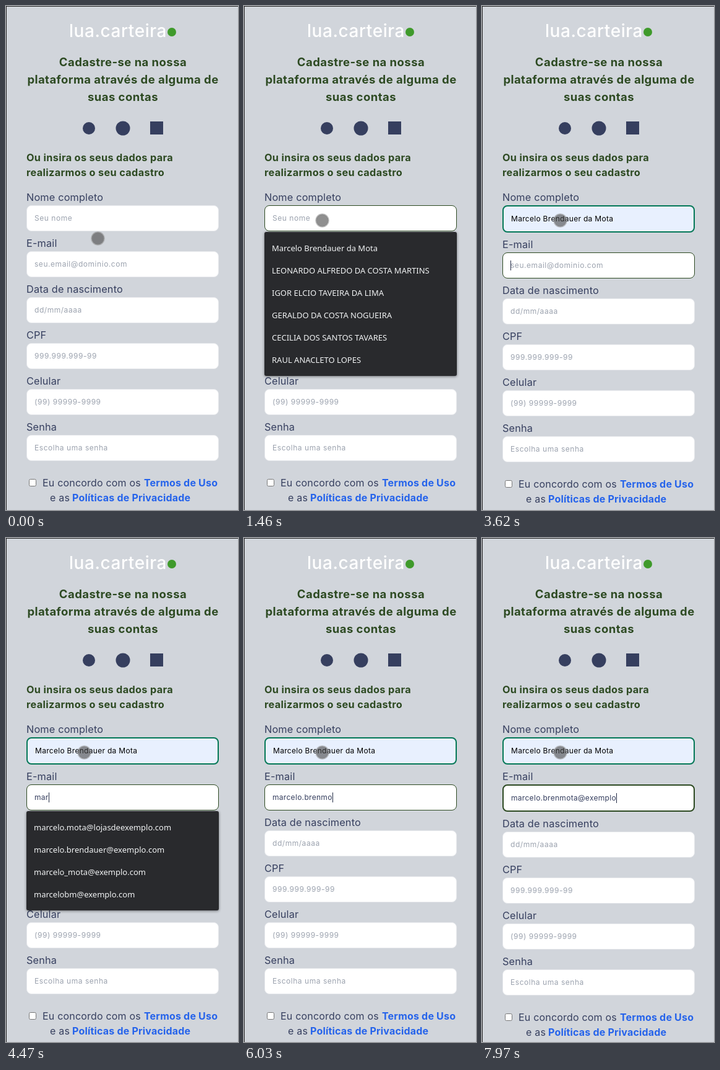
These frames come from a looping animation (375x812 px, 8 s). An HTML page:

```html
<!DOCTYPE html>
<html lang="pt-BR">
<head>
<meta charset="utf-8">
<title>Cadastro</title>
<style>
  html, body { margin: 0; width: 100%; height: 100%; overflow: hidden; background: #d1d5db; }
  svg { display: block; width: 375px; height: 812px; font-family: Inter, Roboto, sans-serif; }
  text { white-space: pre; }
  .logo { font-size: 28px; font-weight: 500; letter-spacing: .02em; fill: #fff; }
  .title { font-size: 18.5px; font-weight: 700; letter-spacing: .024em; fill: #2d4a22; text-anchor: middle; }
  .lead { font-size: 16.3px; font-weight: 700; letter-spacing: .02em; fill: #2d4a22; }
  .label { font-size: 16.3px; letter-spacing: .01em; fill: #363f5f; }
  .terms { font-size: 16px; letter-spacing: .012em; fill: #363f5f; }
  .link { font-size: 16px; font-weight: 700; letter-spacing: .012em; fill: #2563eb; }
  .hint, .value { font-size: 12px; }
  .hint { letter-spacing: .045em; fill: #9ca3af; }
  .value { letter-spacing: .025em; fill: #363f5f; }
  .filled { fill: #000; }
  .option { font: 13px "Noto Sans", "Open Sans", sans-serif; fill: #f1f3f4; }
  .menu { filter: drop-shadow(0 1px 2px #0007); }
</style>
</head>
<body>
<svg id="stage" viewBox="0 0 375 812"></svg>
<script>
const LOOP = 8000, GREEN = '#2d4a22';
const stage = document.getElementById('stage');

const FIELDS = [
  ['Nome completo', 'Seu nome'],
  ['E-mail', 'seu.email@dominio.com'],
  ['Data de nascimento', 'dd/mm/aaaa'],
  ['CPF', '999.999.999-99'],
  ['Celular', '(99) 99999-9999'],
  ['Senha', 'Escolha uma senha']
];
const PEOPLE = [
  'Marcelo Brendauer da Mota', 'LEONARDO ALFREDO DA COSTA MARTINS',
  'IGOR ELCIO TAVEIRA DA LIMA', 'GERALDO DA COSTA NOGUEIRA',
  'CECILIA DOS SANTOS TAVARES', 'RAUL ANACLETO LOPES'
];
const MATCHES = [
  'Marcelo Brendauer da Mota', 'Marcelo da Mota', 'MARCELO ANSELMO NOGUEIRA DE MOURA',
  'MARCELO SIQUEIRA MEIRELES', 'Marcelo da mota', 'MARCELO DE MACHADO PAIVA'
];
const EMAILS = [
  'marcelo.mota@lojasdeexemplo.com', 'marcelo.brendauer@exemplo.com',
  'marcelo_mota@exemplo.com', 'marcelobm@exemplo.com'
];

// Moments at which each character appears
const NAME_KEYS = [1690, 1770, 1850, 1930, 2020, 2120, 2230];
const MAIL_KEYS = [
  4170, 4270, 4400, 4510, 4630, 4750, 4870, 5170,
  5340, 5480, 5620, 5750, 5890, 6030, 6200, 6280, 6600,
  7040, 7200, 7350, 7500, 7660, 7810, 7970
];
const POINTER = [[0, 148.5, 374.5], [70, 146, 398], [150, 136, 418], [230, 118, 392], [300, 117, 362], [380, 126.5, 345.5]];

const typed = (text, keys, t) => text.slice(0, keys.filter(k => k <= t).length);
const text = (cls, x, y, s, id = '') => `<text class="${cls}" x="${x}" y="${y}"${id && ` id="${id}"`}>${s}</text>`;
const rect = (x, y, w, h, fill, more = '') => `<rect x="${x}" y="${y}" width="${w}" height="${h}" fill="${fill}" ${more}/>`;
const circle = (x, y, r, fill, more = '') => `<circle cx="${x}" cy="${y}" r="${r}" fill="${fill}" ${more}/>`;

function menu(y, options, active, height = options.length * 36 + 16) {
  const rows = options.map((s, i) =>
    (i === active ? rect(33, y + 8 + i * 36, 311, 36, '#404145') : '') +
    text('option', 45, y + 31 + i * 36, s)).join('');
  return `<clipPath id="cut">${rect(33, y, 311, height, '#000')}</clipPath>
    <g class="menu">${rect(33, y, 311, height, '#292a2d', 'rx="3"')}<g clip-path="url(#cut)">${rows}</g></g>`;
}

// One box with its text; a confirmed box has a 2px border and is 2px taller
function input(y, hint, { value = '', border = '#e5e7eb', width = 1, filled, focus } = {}) {
  const o = width / 2, x = 45 + width, base = y + 24 + width;
  return rect(33 + o, y + o, 311 - width, 40 + width, filled ? '#e8f0fe' : '#fff',
      `rx="${8 - o}" stroke="${border}" stroke-width="${width}"`) +
    text(value ? 'value' + (filled ? ' filled' : '') : 'hint', x, base, value || hint, focus ? 'live' : '') +
    (focus ? rect(x, base - 12, 1, 16, '#222b45', `id="caret" data-x="${value ? x : 0}"`) : '');
}

const HEADER =
  rect(0, 0, 375, 812, '#d1d5db') +
  text('logo', 102, 50, 'lua.carteira') + circle(268, 42, 7, '#3f9a2b') +
  text('title', 189, 97, 'Cadastre-se na nossa') +
  text('title', 189, 125, 'plataforma através de alguma de') +
  text('title', 189, 153, 'suas contas') +
  circle(134, 197, 10, '#363f5f') + circle(189, 197, 11.5, '#363f5f') + rect(233, 186, 21, 21, '#363f5f') +
  text('lead', 33, 250, 'Ou insira os seus dados para') +
  text('lead', 33, 274, 'realizarmos o seu cadastro');

function nameState(t) {
  const filled = t >= 2990;
  const value = filled ? PEOPLE[0] : typed('Marcelo', NAME_KEYS, t);
  const focus = t >= 690 && t < 3620 && !(t >= 1190 && t < 1690) && !(t >= 2690 && t < 3220);
  const border = t < 690 ? undefined : t < 3620 ? GREEN : '#047857';
  return { value, filled, focus, border, width: value ? 2 : 1 };
}

function mailState(t) {
  if (t < 3620) return {};
  return {
    value: typed('marcelo.brenmota@exemplo', MAIL_KEYS, t),
    focus: true, border: GREEN, width: t >= 7040 ? 2 : 1
  };
}

function openMenu(t) {
  if (t >= 760 && t < 1690) return menu(364, PEOPLE);
  if (t >= 1690 && t < 3220) return menu(366, MATCHES, t >= 2990 ? 0 : -1);
  if (t >= 4170 && t < 5260) return menu(440, EMAILS);
  if (t >= 5260 && t < 5340) return menu(440, EMAILS, -1, 58);
  return '';
}

function draw(t) {
  const states = [nameState(t), mailState(t)];
  let out = HEADER, y = 321;
  FIELDS.forEach(([label, hint], i) => {
    out += text('label', 33, y - 7, label) + input(y, hint, states[i]);
    y += 72 + 2 * (states[i]?.width || 1);
  });
  y -= 4;
  out += rect(37.5, y + 1.5, 11, 11, '#fff', 'rx="2" stroke="#767676"') +
    text('terms', 59, y + 13, 'Eu concordo com os') + text('link', 223, y + 13, 'Termos de Uso') +
    text('terms', 71, y + 37, 'e as') + text('link', 107, y + 37, 'Políticas de Privacidade');
  const [, px, py] = POINTER.filter(p => p[0] <= t).pop();
  return out + openMenu(t) +
    circle(px, py, 10, '#444', 'fill-opacity=".6" stroke="#888" stroke-opacity=".5" stroke-width="2.5"') +
    rect(0, 0, 375, 1, '#222') + rect(0, 0, 1, 812, '#222');
}

let shown = '';
function tick(now) {
  const picture = draw(now % LOOP);
  if (picture !== shown) {
    stage.innerHTML = shown = picture;
    const caret = document.getElementById('caret');
    if (caret && +caret.dataset.x) {
      const end = +caret.dataset.x + document.getElementById('live').getComputedTextLength();
      caret.setAttribute('x', Math.round(end));
    }
  }
  requestAnimationFrame(tick);
}
tick(0);
</script>
</body>
</html>
```
